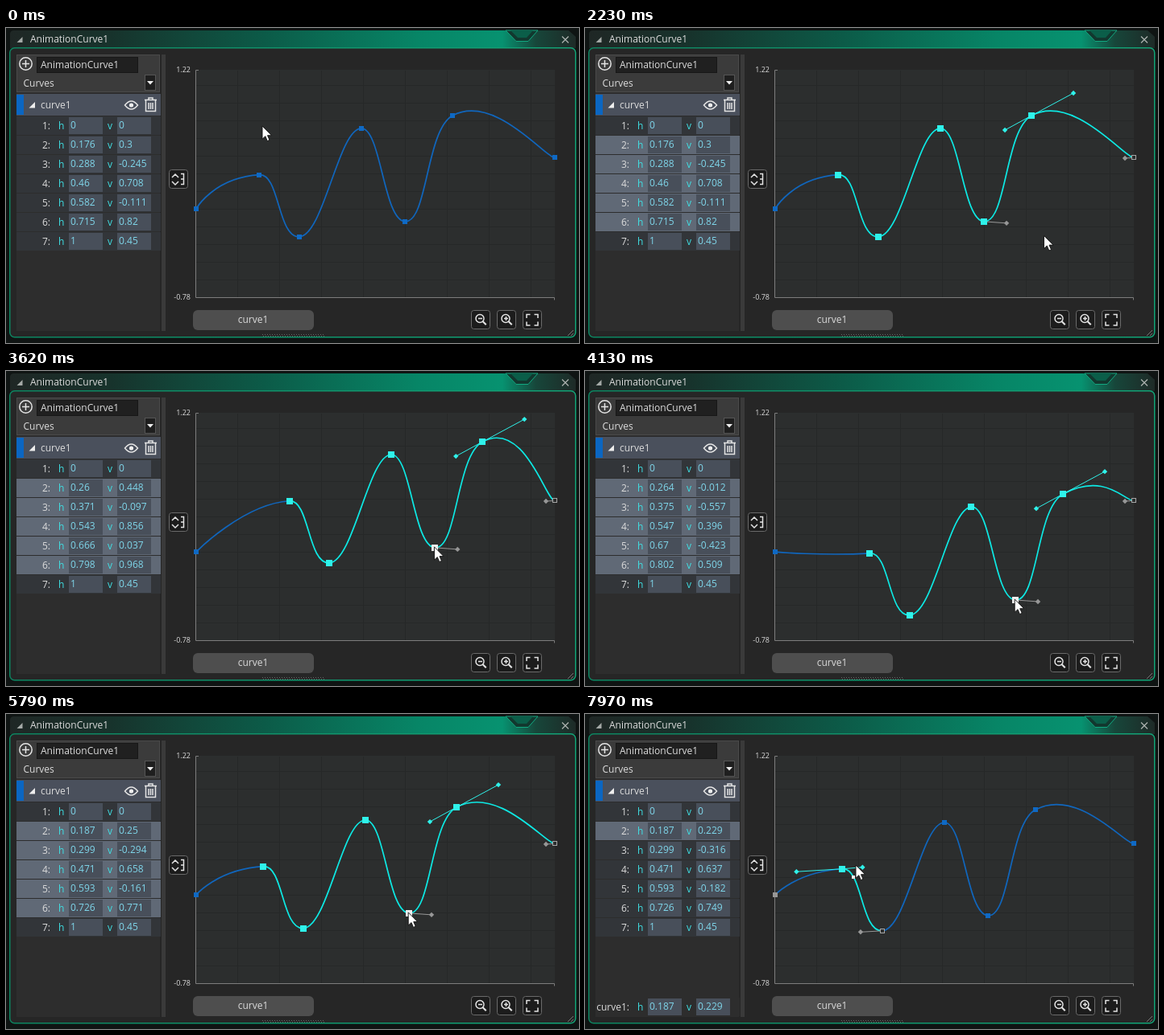
These frames come from a looping animation (711x392 px, 8000 ms). An HTML page:

```html
<!DOCTYPE html>
<html lang="en">
<head>
<meta charset="utf-8">
<title>Curve editor</title>
<style>
  html, body { margin: 0; width: 100%; height: 100%; overflow: hidden; background: #0f1413; }
  svg { display: block; width: 711px; height: 392px; }
  text { font: 12px "Open Sans", "Noto Sans", sans-serif; fill: #dcdcdc; white-space: pre; }
  .tick { font-size: 9px; text-anchor: end; }
  .axis { fill: #3fdfe3; }
  .value { fill: #7fd6ea; }
  .icon { fill: none; stroke: #e4e4e4; stroke-width: 1.5; }
  .button { fill: #1c1c1c; stroke: #6a6a6a; }
</style>
</head>
<body>
<svg viewBox="0 0 711 392" xmlns="http://www.w3.org/2000/svg">
  <defs>
    <linearGradient id="bar">
      <stop offset="0" stop-color="#1f2725"/>
      <stop offset=".18" stop-color="#17332c"/>
      <stop offset=".45" stop-color="#0c5b48"/>
      <stop offset=".72" stop-color="#078566"/>
      <stop offset=".87" stop-color="#079270"/>
      <stop offset=".93" stop-color="#17463a"/>
      <stop offset="1" stop-color="#1e2a27"/>
    </linearGradient>
    <linearGradient id="rim" x1="0" y1="0" x2="1" y2="0">
      <stop offset="0" stop-color="#0d8460"/>
      <stop offset="1" stop-color="#12a477"/>
    </linearGradient>
  </defs>

  <!-- window -->
  <path d="M5 25V8q0-5 5-5H698l9 8V25Z" fill="url(#bar)"/>
  <path d="M620 3l13 13.500h15l12-13.500z" fill="#12382f" stroke="#12a880"/>
  <path d="M626 3l9 9h11l8-9z" fill="#0b5e49"/>
  <path d="M20.500 11v7h-7z" fill="#a5aaa8"/>
  <text x="30" y="18">AnimationCurve1</text>
  <path d="M690 10.500l8 8m0-8l-8 8" stroke="#aab0ae" stroke-width="1.300"/>
  <rect x="4.750" y="24.750" width="702" height="360" rx="6" fill="#262626" stroke="url(#rim)" stroke-width="1.500"/>
  <path d="M318 381.500h77M319 383.500h76" stroke="#666" stroke-dasharray="1 2"/>
  <path d="M697 383l7-7m-3 7l3-3" stroke="#777"/>

  <!-- side panel -->
  <rect x="13" y="33" width="178" height="344" fill="#2d2d2d"/>
  <rect x="13.500" y="33.500" width="177" height="46" fill="#3b3b3b" stroke="#4a4a4a"/>
  <rect x="38.500" y="36.500" width="125" height="19" fill="#202020" stroke="#171717"/>
  <g class="icon"><circle cx="24.500" cy="44.500" r="7.700"/><path d="M20 44.500h9m-4.500-4.500v9"/></g>
  <text x="43" y="50">AnimationCurve1</text>
  <text x="21.500" y="73">Curves</text>
  <rect x="172.500" y="58.500" width="13" height="19" fill="#1f1f1f" stroke="#555"/>
  <path d="M175 66h8l-4 4.500z" fill="#eee"/>
  <rect x="13" y="82" width="179" height="27" fill="#4a505c"/>
  <rect x="13" y="83" width="9" height="25" fill="#0b66c2"/>
  <path d="M36 92v7.500h-7.500z" fill="#eee"/>
  <text x="43" y="100">curve1</text>
  <path class="icon" d="M147.500 96q8-10 16 0q-8 10-16 0z"/>
  <circle cx="155.500" cy="96" r="2.600" fill="#eee"/>
  <path class="icon" d="M172 89.500h15m-10-.5v-2h5v2m-8.500 1v13.500h12V90m-8.500 3v8m2.500-8v8m2.500-8v8" stroke-width="1.200"/>
  <g id="rows"></g>
  <rect x="193" y="33" width="5" height="344" fill="#3a3a3a"/>

  <!-- graph -->
  <rect x="236" y="52" width="445" height="283" fill="#2c2e2e"/>
  <path id="grid" stroke="#262828" fill="none"/>
  <path d="M239 52.500h-3.500v283h445v3" fill="none" stroke="#7d7d7d"/>
  <text class="tick" x="229" y="55">1.22</text>
  <text class="tick" x="229" y="338">-0.78</text>
  <rect class="button" x="202.500" y="176.500" width="23" height="23" rx="3"/>
  <path class="icon" d="M206 186l4-4 4 4m-8 5l4 4 4-4m3-9.500h3.500v13H217m0-6.500h3"/>
  <rect x="232" y="351" width="150" height="25" rx="6" fill="#4e4e4e"/>
  <text x="306.500" y="367" text-anchor="middle">curve1</text>
  <g id="tools"></g>
  <path d="M586 361.500h5m27 0h5m-2.500-2.500v5" class="icon" stroke-width="1.200"/>
  <path class="icon" d="M646 361v-4.500h4.500m5 0h4.500v4.500m0 4.500v4.500h-4.500m-5 0h-4.500v-4.500"/>

  <g id="plot"></g>
  <path id="cursor" d="M0 0V16.200L3.800 12.700L6.300 18.600L9 17.400L6.500 11.700H11.500Z" fill="#fff" stroke="#111" stroke-width=".9"/>
</svg>
<script>
const LOOP = 8000;
const BLUE = '#1066bd', CYAN = '#0de9e4', GRAY = '#979797';
const $ = id => document.getElementById(id);

// h, v, left handle, right handle (handles in pixels)
const knots = [
  [0, 0, [0, 0], [0, 0]],
  [.1763, .3, [-57, 3.5], [25, -2]],
  [.2877, -.2448, [-27, 1.5], [30, -1.5]],
  [.4597, .708, [-28, 1], [25, -1]],
  [.5822, -.111, [-27, -2], [28, 2]],
  [.7147, .8204, [-33, 18], [52, -28]],
  [1, .45, [-11, .5], [0, 0]]
];

// time, h shift, v shift
const drag = [
  [2890, 0, 0], [3110, .0245, .021], [3420, .062, .175], [3750, .09, .11],
  [4130, .0875, -.311], [4320, .04, -.42], [4590, -.045, -.4],
  [4870, -.0788, -.1698], [5160, -.07, .1], [5410, -.02, .235],
  [5790, .0111, -.0496], [6200, .0111, -.071]
];
// time, x, y of the pointer when it is not holding a knot
const moves = [
  [50, 318, 122], [400, 406, 159], [840, 290, 91], [880, 290, 91],
  [1390, 568.5, 264], [1620, 585, 278.5], [2060, 585, 278.5],
  [2480, 530, 223], [2870, 494.5, 240]
];
const leave = [
  [6260, 499.5, 250], [6700, 440, 212], [7080, 396, 200],
  [7600, 319, 193], [7870, 319, 193], [7970, 336, 188]
];

// Smooth interpolation that never overshoots its keys
function track(keys, t) {
  const n = keys.length - 1;
  if (t <= keys[0][0]) return keys[0].slice(1);
  if (t >= keys[n][0]) return keys[n].slice(1);
  const i = keys.findIndex(k => k[0] > t) - 1;
  const span = keys[i + 1][0] - keys[i][0], u = (t - keys[i][0]) / span;
  const rate = (j, c) => (keys[j + 1][c] - keys[j][c]) / (keys[j + 1][0] - keys[j][0]);
  const slope = (j, c) => {
    if (j === 0 || j === n) return 0;
    const a = rate(j - 1, c), b = rate(j, c);
    return a * b <= 0 ? 0 : 2 * a * b / (a + b);
  };
  return [1, 2].map(c => {
    const a = keys[i][c], b = keys[i + 1][c];
    const s = u * u * (3 - 2 * u);
    return a + (b - a) * s + span * u * (1 - u) * ((1 - u) * slope(i, c) - u * slope(i + 1, c));
  });
}

const toX = h => 236 + h * 445;
const toY = v => 52.5 + (1.22 - v) * 141.5;
const show = n => String(+n.toFixed(3));

function rowMarkup(name, y, id) {
  const field = x => `<rect x="${x}" y="${y + 1}" width="42" height="21" fill="#484f5a"/>`;
  return `<rect id="bg${id}" x="13" y="${y}" width="179" height="23"/>` + field(78) + field(138) +
    `<text x="55" y="${y + 16}" text-anchor="end">${name}:</text>` +
    `<text class="axis" x="65" y="${y + 16}">h</text><text class="axis" x="126" y="${y + 16}">v</text>` +
    `<text class="value" id="h${id}" x="80" y="${y + 15}"></text>` +
    `<text class="value" id="v${id}" x="140" y="${y + 15}"></text>`;
}

function build() {
  $('rows').innerHTML = knots.map((_, i) => rowMarkup(i + 1, 110 + 24 * i, i)).join('') +
    `<g id="foot">${rowMarkup('curve1', 353, 'F')}</g>`;
  $('bgF').setAttribute('fill', '#2d2d2d');
  let d = '';
  for (let x = 287.5; x < 681; x += 52) d += `M${x} 53V335`;
  for (let y = 71.5; y < 335; y += 22) d += `M236 ${y}H681`;
  $('grid').setAttribute('d', d);
  $('tools').innerHTML = [577, 609, 641].map((x, i) =>
    `<rect class="button" x="${x + .5}" y="351.5" width="23" height="23" rx="3"/>` +
    (i < 2 ? `<g class="icon"><circle cx="${x + 11}" cy="361.500" r="5"/>` +
      `<path d="M${x + 14.7} 365.200l4 4" stroke-width="2"/></g>` : '')).join('');
}

function selection(t, pts, tip) {
  if (t < 880 || (t >= 6700 && t < 7560)) return [];
  if (t >= 7560) return [1];
  if (t >= 1800) return [1, 2, 3, 4, 5];
  return [1, 2, 3, 4, 5].filter(i => pts[i].x < tip[0] && pts[i].y < tip[1]);
}

const line = (a, b, color) =>
  `<path d="M${a.x} ${a.y}L${b.x} ${b.y}" stroke="${color}"/>`;
const diamond = (p, color) =>
  `<path d="M${p.x - 3.2} ${p.y}l3.200-3.200 3.200 3.200-3.200 3.200z" fill="${color}"/>`;
const square = (p, size, fill, stroke = 'none') => {
  const half = size / 2, snap = n => Math.round(n) - half;
  return `<rect x="${snap(p.x)}" y="${snap(p.y)}" width="${size}" height="${size}" fill="${fill}" stroke="${stroke}"/>`;
};
const handle = (p, [dx, dy], color) => {
  if (!dx) return '';
  const end = { x: p.x + dx, y: p.y + dy };
  return line(p, end, color) + diamond(end, color);
};

// Control points, kept between their two knots
function controls(pts, i) {
  const a = pts[i], b = pts[i + 1], gap = b.x - a.x;
  const fit = (p, [dx, dy]) => {
    const s = Math.min(1, gap / (Math.abs(dx) || 1));
    return { x: p.x + dx * s, y: p.y + dy * s };
  };
  return [a, fit(a, knots[i][3]), fit(b, knots[i + 1][2]), b];
}

function along(c, u) {
  const w = [(1 - u) ** 3, 3 * u * (1 - u) ** 2, 3 * u * u * (1 - u), u ** 3];
  const mix = k => c.reduce((sum, p, i) => sum + p[k] * w[i], 0);
  return { x: mix('x'), y: mix('y') };
}

function draw(t) {
  const [dh, dv] = track(drag, t);
  const pts = knots.map(([h, v], i) => {
    if (i > 0 && i < 6) { h += dh; v += dv; }
    return { h, v, x: toX(h), y: toY(v) };
  });
  const tip = t < 2890 ? track(moves, t)
    : t < 6260 ? [pts[4].x - .8, pts[4].y - 1]
    : track(leave, t);
  const sel = selection(t, pts, tip);
  const active = sel.length ? sel[sel.length - 1] : -1;

  let out = '';
  if (t >= 880 && t < 1800) {
    const w = Math.max(0, tip[0] - 291.5), h = Math.max(0, tip[1] - 92);
    out += `<rect x="290" y="91" width="${w}" height="${h}" fill="#fff" fill-opacity=".5"/>`;
  }
  for (let i = 0; i < 6; i++) {
    const [a, b, c, d] = controls(pts, i);
    out += `<path d="M${a.x} ${a.y}C${b.x} ${b.y} ${c.x} ${c.y} ${d.x} ${d.y}" fill="none" ` +
      `stroke="${sel.includes(i) ? CYAN : BLUE}" stroke-width="1.700"/>`;
  }
  if (active > 0) {
    out += handle(pts[active - 1], knots[active - 1][3], GRAY) +
      handle(pts[active + 1], knots[active + 1][2], GRAY) +
      handle(pts[active], knots[active][2], '#2ff2ea') +
      handle(pts[active], knots[active][3], '#2ff2ea');
  }
  pts.forEach((p, i) => {
    const chosen = sel.includes(i);
    const near = Math.hypot(p.x - tip[0], p.y - tip[1]) < 6;
    if (near) out += square(p, chosen ? 8 : 6, '#eee');
    else if (chosen) out += square(p, 8, '#2ff2ea');
    else if (active > 0 && i === 0 && active === 1) out += square(p, 6, GRAY);
    else if (active > 0 && Math.abs(i - active) === 1) out += square(p, 5, '#2b2d2d', '#a5a5a5');
    else out += square(p, 6, '#0f69c4');
  });
  if (t >= 7920) out += square(along(controls(pts, 1), .24), 4, '#eee');
  $('plot').innerHTML = out;

  pts.forEach((p, i) => {
    $('bg' + i).setAttribute('fill', sel.includes(i) ? '#606976' : '#323539');
    $('h' + i).textContent = show(p.h);
    $('v' + i).textContent = show(p.v);
  });
  $('foot').style.display = sel.length === 1 && t >= 7560 ? '' : 'none';
  $('hF').textContent = show(pts[1].h);
  $('vF').textContent = show(pts[1].v);
  $('cursor').setAttribute('transform', `translate(${tip[0]} ${tip[1]})`);
}

build();
const start = performance.now();
function tick(now) {
  draw(Math.max(0, now - start) % LOOP);
  requestAnimationFrame(tick);
}
draw(0);
requestAnimationFrame(tick);
</script>
</body>
</html>
```
